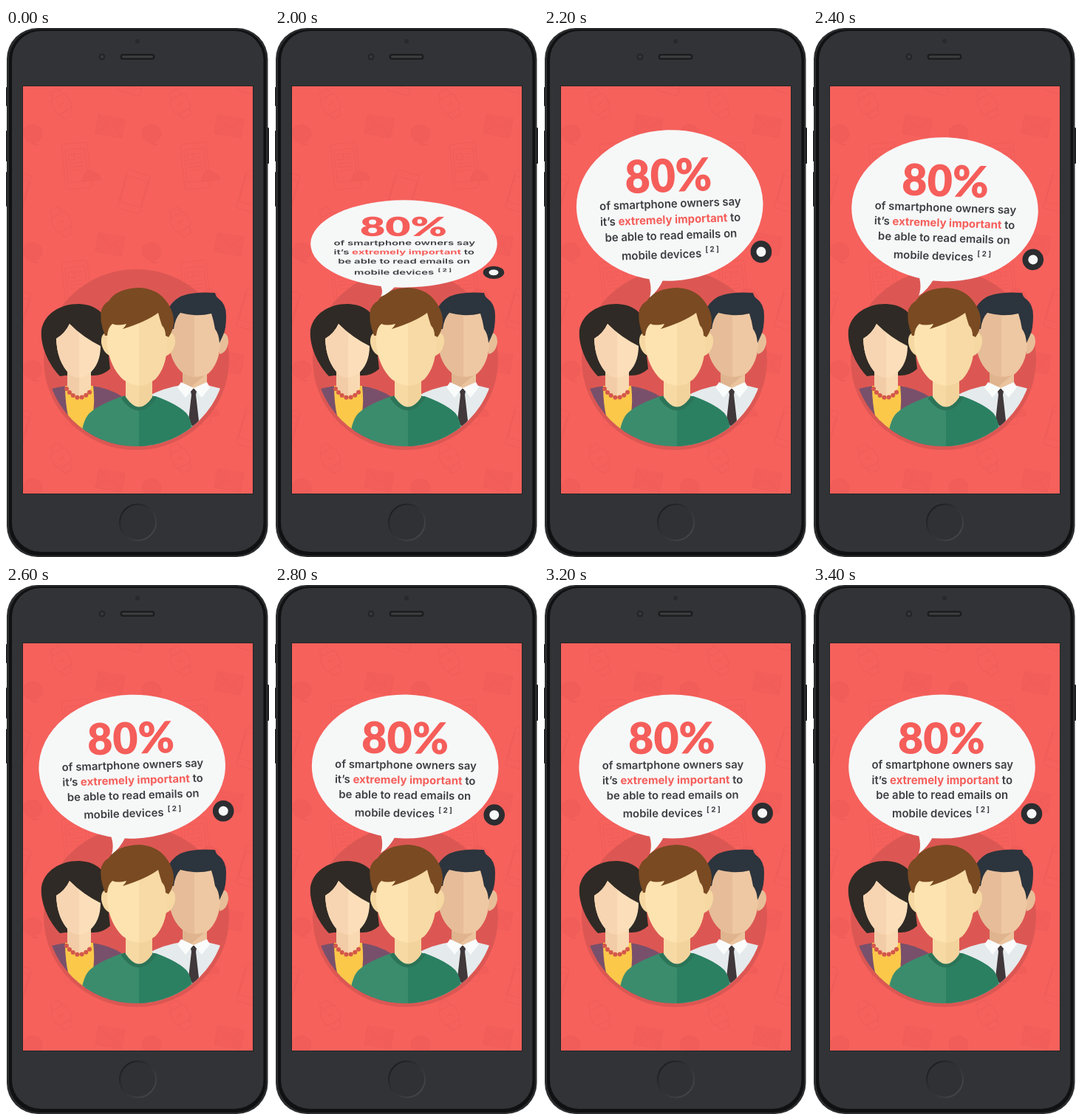
These frames come from a looping animation (356 px wide and 717 px high, 5400 ms). An HTML page:

```html
<!DOCTYPE html>
<html lang="en">
<head>
<meta charset="utf-8">
<title>Mobile email fact</title>
<style>
  html, body { margin: 0; width: 100%; height: 100%; overflow: hidden; background: #fff; }
  svg { display: block; width: 100%; height: 100%; }
  .copy { font: 600 14.9px Inter, "Open Sans", sans-serif; fill: #3c3f42; text-anchor: middle; }
  .big { font: 900 59px Lato, "Open Sans", sans-serif; fill: #f55e5a; text-anchor: middle; }
  .hot { font-weight: 700; fill: #f55e5a; }
  .note { font-size: 10px; font-weight: 700; text-anchor: start; }
  .start { text-anchor: start; }
  #bubble { visibility: hidden; }
</style>
</head>
<body>
<svg viewBox="0 0 356 717">
  <defs>
    <pattern id="icons" x="12" y="62" width="161" height="160" patternUnits="userSpaceOnUse">
      <g fill="none" stroke="#e95853" stroke-width="1.2" stroke-linejoin="round" opacity=".5">
        <!-- watch -->
        <g transform="translate(63 41) rotate(-28)">
          <rect x="-12" y="-11" width="24" height="22" rx="5"/>
          <path d="M-8-11l2-9H6l2 9M-8 11l2 9H6l2-9M-4 0h8"/>
        </g>
        <!-- envelope -->
        <g transform="translate(129 71) rotate(10)" fill="#ef5b57">
          <rect x="-18" y="-13" width="36" height="26" rx="1"/>
          <path d="M-18-13L0 3l18-16M-18 13l13-14M18 13L5-1"/>
        </g>
        <!-- speech blob -->
        <path d="M11 80a13 12 0 1 1 14 13q4 3 8 3q-8 2-12-3q-10-4-10-13z" fill="#ec5a56"/>
        <!-- phone with page -->
        <g transform="translate(83 125) rotate(-6)">
          <rect x="-17" y="-31" width="35" height="62" rx="4"/>
          <path d="M-13-23h27v44h-27zM-9-17h8v8h-8zM2-16h8M2-11h8M-9-4h19M-9 1h19M-9 6h19"/>
          <path d="M10 12q8-8 14 0q7 1 7 10H6z" fill="#ec5a56"/>
        </g>
      </g>
      <!-- plain phone, split over the tile corners -->
      <g fill="none" stroke="#e95853" stroke-width="1.2" opacity=".5">
        <g id="cell"><rect x="-16" y="-27" width="32" height="54" rx="4" transform="rotate(16)"/>
        <path d="M-9-22L19-14L9 21L-19 13z"/></g>
        <use href="#cell" x="161"/><use href="#cell" y="160"/><use href="#cell" x="161" y="160"/>
      </g>
    </pattern>
    <linearGradient id="ring" x2="1" y2="1">
      <stop offset="0" stop-color="#17181a"/><stop offset="1" stop-color="#4a4c4f"/>
    </linearGradient>
    <clipPath id="disc"><circle cx="176" cy="445" r="122"/></clipPath>
  </defs>

  <!-- handset -->
  <g fill="#1b1c1e">
    <rect x="0" y="80" width="4" height="26" rx="1"/>
    <rect x="0" y="139" width="4" height="42" rx="1"/>
    <rect x="0" y="195" width="4" height="47" rx="1"/>
    <rect x="352" y="135" width="4" height="49" rx="1"/>
  </g>
  <rect x="1" y="0" width="353.500" height="717" rx="42" fill="#2a2c2e"/>
  <rect x="4" y="2" width="348" height="713" rx="41" fill="#101112"/>
  <rect x="8" y="4" width="340.500" height="706" rx="39" fill="#313336"/>
  <circle cx="178" cy="18" r="3" fill="#27292b"/>
  <circle cx="130" cy="39" r="4.500" fill="#242628"/>
  <circle cx="130" cy="39" r="2" fill="#3a3d44"/>
  <rect x="154.500" y="35" width="47" height="8" rx="4" fill="#1c1d1f"/>
  <rect x="157" y="37.500" width="42" height="3" rx="1.500" fill="#3d3f41"/>
  <circle cx="178.500" cy="670" r="24.500" fill="#2f3134" stroke="url(#ring)" stroke-width="2"/>

  <!-- screen -->
  <rect x="22" y="78" width="313" height="554" fill="#232527"/>
  <rect x="23" y="79" width="311" height="552" fill="#f6615c"/>
  <rect x="23" y="79" width="311" height="552" fill="url(#icons)"/>
  <ellipse cx="176.500" cy="449.500" rx="125.500" ry="122.500" fill="#dc5753"/>

  <!-- woman -->
  <path d="M73 472C57 455 46 430 48 409C52 386 76 373 100 374C117 375 128 382 133 392L141 462Q130 472 116 471L80 471Z" fill="#2f2a25"/>
  <g clip-path="url(#disc)">
    <path d="M58 490Q72 486 84 485H116Q140 488 158 500V575H58Z" fill="#79506b"/>
    <path d="M80 485H118Q122 520 112 545H90Q80 520 80 485Z" fill="#fbc84a"/>
  </g>
  <path d="M83 460H115V488Q99 510 83 488Z" fill="#f2cca6"/>
  <path d="M99 460H115V488Q108 498 99 499Z" fill="#f9d9b2"/>
  <path d="M82 489Q99 513 117 489" fill="none" stroke="#d4574c" stroke-width="6" stroke-linecap="round" stroke-dasharray="0 6.300"/>
  <path d="M68 421Q80 414 86 401Q104 419 128 431Q128 456 112 469Q99 478 86 469Q69 452 68 421Z" fill="#fcdfba"/>
  <path d="M68 421Q80 414 86 401L99 414V474Q92 474 86 469Q69 452 68 421Z" fill="#f7d5b2"/>
  <path d="M68 421Q67 450 82 470H73Q60 455 60 430Z" fill="#2f2a25"/>

  <!-- man with tie -->
  <g clip-path="url(#disc)">
    <path d="M190 500Q215 487 238 484H272Q288 488 304 492V575H190Z" fill="#e5eaec"/>
    <path d="M249 488H259L257 497L261 532L254 542L247 532L251 497Z" fill="#40383a"/>
  </g>
  <path d="M239 458H272V482L254 489L239 482Z" fill="#dfb48e"/>
  <path d="M272 468V482L254 489L250 487Z" fill="#ebc49e"/>
  <path d="M237 480L254 488L243 501L232 487ZM272 480L254 488L265 501L276 487Z" fill="#fafcfc"/>
  <path d="M288 414Q301 410 301 426Q299 440 289 442Z" fill="#e7be98"/>
  <path d="M221 384H290V430Q288 456 273 469Q256 477 240 468Q224 455 221 430Z" fill="#eec8a2"/>
  <path d="M221 384H255V473Q246 472 240 468Q224 455 221 430Z" fill="#e6bd98"/>
  <path d="M217 386Q223 371 236 364Q252 357 283 359Q284 364 288 367Q298 374 298 390Q298 408 294 416L289 427Q288 414 283 408Q281 396 278 387Q258 392 236 386Q229 393 227 408L219 408Z" fill="#2c343d"/>

  <!-- man in front -->
  <g clip-path="url(#disc)">
    <path d="M100 575Q101 534 113 522Q126 510 158 499H202Q232 510 244 522Q254 534 255 575Z" fill="#3b8c6d"/>
    <path d="M180 499H202Q232 510 244 522Q254 534 255 575H180Z" fill="#2b8062"/>
  </g>
  <path d="M158 500Q180 531 201 500" fill="none" stroke="#2b7458" stroke-width="6"/>
  <path d="M162 470H198V500Q180 527 162 500Z" fill="#f7d9a4"/>
  <path d="M180 470H198V500Q190 513 180 513Z" fill="#f3d39c"/>
  <path d="M141 414Q128 410 129 427Q132 442 143 445ZM217 414Q230 410 229 427Q226 442 215 445Z" fill="#f6d8a2"/>
  <path d="M137 385H218V430Q217 460 202 476Q180 493 158 476Q141 460 137 430Z" fill="#fde3b0"/>
  <path d="M180 385H218V430Q217 460 202 476Q191 484 180 484Z" fill="#f7daa5"/>
  <path d="M134 417Q126 396 129 382Q133 373 139 370Q150 353 180 352Q206 353 219 373Q228 387 227 400Q226 411 220 419L216 417Q216 408 211 403Q208 394 206 386Q190 398 158 408Q162 404 163 401Q151 404 144 401Q138 406 137 417Z" fill="#7a4a22"/>

  <!-- speech bubble -->
  <g id="bubble">
    <path d="M142 334L144.500 346Q146 356 143 364Q155 356 163 340Z" fill="#f6f8f8"/>
    <ellipse cx="174.500" cy="246" rx="126.300" ry="97.500" fill="#f6f8f8"/>
    <text class="big" x="174" y="228.500">80%</text>
    <text class="copy" x="175.300" y="249">of smartphone owners say</text>
    <text class="copy" x="174.800" y="269.500">it’s <tspan class="hot">extremely important</tspan> to</text>
    <text class="copy" x="174.700" y="290">be able to read emails on</text>
    <text class="copy start" x="107" y="314.500">mobile devices</text>
    <text class="copy note" x="220.500" y="308">[ 2 ]</text>
    <circle cx="296" cy="310" r="14.300" fill="#2b2d30"/>
    <circle cx="296" cy="310" r="6.500" fill="#f6f8f8"/>
  </g>
</svg>
<script>
  const LOOP = 5400, SHOW = 2000, STEP = 100, LAST = 14;
  const bubble = document.getElementById("bubble");

  // hatch: [percent, degrees, vertical scale]
  const keys = [
    [0, 0, 0.6], [20, -2, 1.05], [35, 2, 1], [50, -2, 1],
    [65, 1, 1], [80, -1, 1], [100, 0, 1]
  ];

  const ease = u => u * u * (3 - 2 * u);

  function pose(p) {
    const i = Math.max(1, keys.findIndex(k => p <= k[0]));
    const [p0, a0, k0] = keys[i - 1], [p1, a1, k1] = keys[i];
    const e = ease((p - p0) / (p1 - p0));
    return [a0 + (a1 - a0) * e, k0 + (k1 - k0) * e];
  }

  function draw(now) {
    const t = now % LOOP;
    bubble.style.visibility = t < SHOW ? "hidden" : "visible";
    if (t >= SHOW) {
      const n = Math.min(LAST, Math.floor((t - SHOW) / STEP));
      const [angle, k] = pose(n ? Math.min(100, 5 + 7.2 * n) : 1.5);
      bubble.setAttribute("transform",
        `translate(179 364.5) rotate(${angle}) scale(1 ${k}) translate(-179 -364.5)`);
    }
  }

  function tick() {
    draw(performance.now());
    requestAnimationFrame(tick);
  }
  tick();
</script>
</body>
</html>
```
